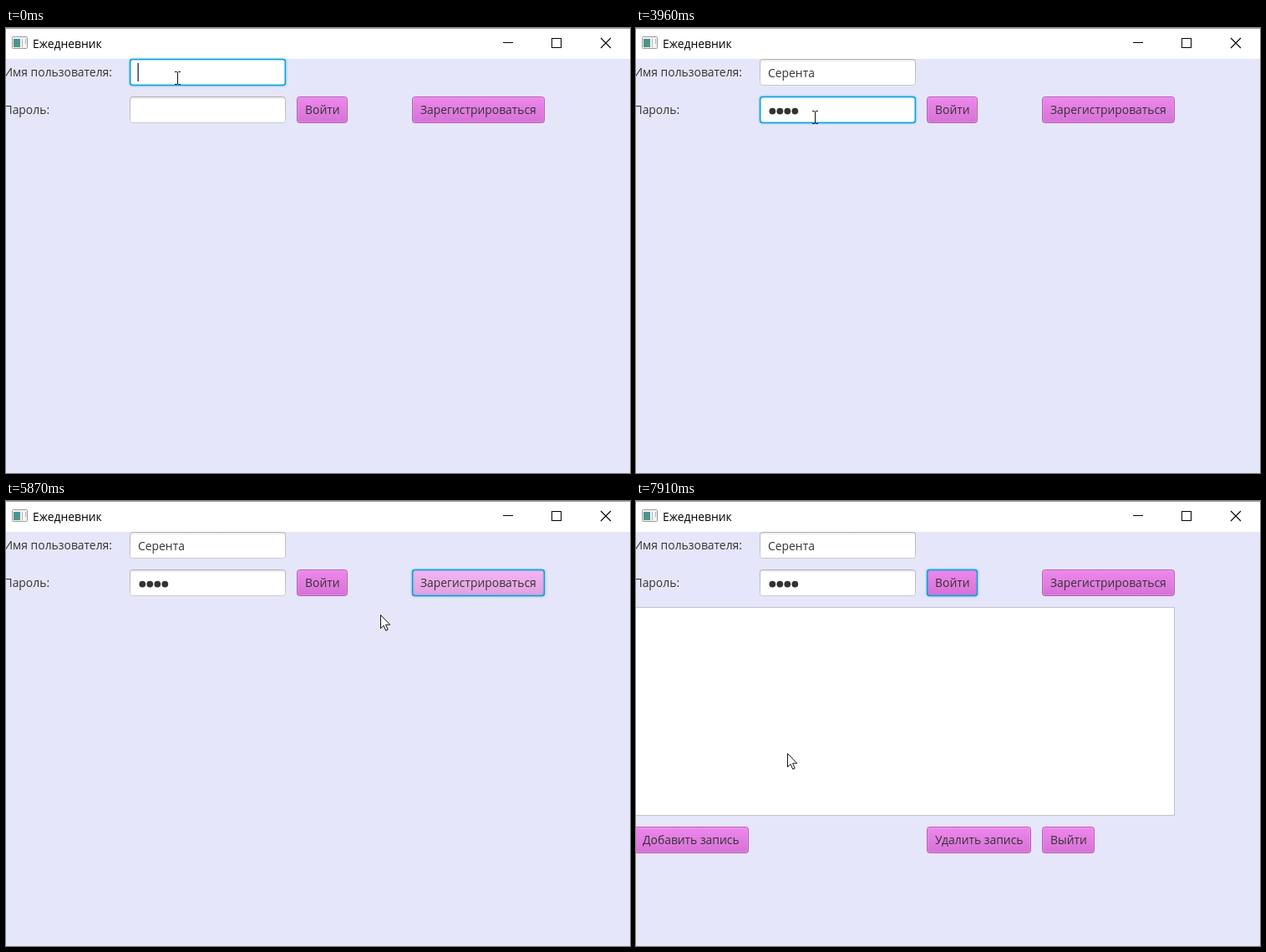
These frames come from a looping animation (747 px wide and 533 px high, 8000 ms). An HTML page:

```html
<!DOCTYPE html>
<html lang="ru">
<head>
<meta charset="utf-8">
<title>Ежедневник</title>
<style>
  html, body { margin: 0; width: 100%; height: 100%; overflow: hidden; background: #e6e6fa; }
  svg { display: block; width: 747px; height: 533px; }
  text { font: 13.9px "Open Sans", "Noto Sans", sans-serif; fill: #333; white-space: pre; }
</style>
</head>
<body>
<svg id="stage" viewBox="0 0 747 533" xmlns="http://www.w3.org/2000/svg">
  <defs>
    <linearGradient id="normal" x2="0" y2="1"><stop stop-color="#ee88ec"/><stop offset="1" stop-color="#d671d6"/></linearGradient>
    <linearGradient id="hover" x2="0" y2="1"><stop stop-color="#f4b6f2"/><stop offset="1" stop-color="#e0a0df"/></linearGradient>
    <linearGradient id="pressed" x2="0" y2="1"><stop stop-color="#dc80da"/><stop offset="1" stop-color="#c46bc5"/></linearGradient>
    <linearGradient id="shade" x2="0" y2="1"><stop stop-color="#e4e4e4"/><stop offset=".13" stop-color="#fff"/></linearGradient>
    <linearGradient id="rim" x2="0" y2="1"><stop stop-color="#b2b2b4"/><stop offset="1" stop-color="#c9c9cb"/></linearGradient>
    <linearGradient id="teal" x2="0" y2="1"><stop stop-color="#4a8fa0"/><stop offset="1" stop-color="#4f9a78"/></linearGradient>
  </defs>
  <rect width="747" height="533" fill="#e6e6fa"/>
  <rect width="747" height="37" fill="#fff"/>
  <rect width="747" height="1" fill="#a0a0a0"/>
  <g id="icon">
    <rect x="7.5" y="10.5" width="18" height="14" rx="1" fill="#f4f4f4" stroke="#9a9a9a"/>
    <rect x="9" y="13" width="8" height="10" fill="url(#teal)"/>
    <path d="M19.5 13V23M23.5 13V19" stroke="#b4b4b4" fill="none"/>
  </g>
  <text x="32" y="24" style="fill:#000">Ежедневник</text>
  <g fill="none" stroke="#000">
    <path d="M595 17.5H607"/>
    <rect x="653.5" y="12.5" width="11" height="11"/>
    <path d="M712 12L724 24M724 12L712 24" stroke-width="1.1"/>
  </g>
  <text x="-2.5" y="58">Имя пользователя:</text>
  <text x="-2.5" y="103">Пароль:</text>
  <g id="form"></g>
  <g id="diary">
    <rect x="-1.5" y="127.5" width="646" height="249" fill="#fff" stroke="#c4c4c8"/>
  </g>
  <text id="name" x="158" y="59"></text>
  <g id="dots" fill="#333"></g>
  <rect id="caret" width="1.3" height="22" fill="#222"/>
  <path id="beam" d="M-3.5 -7.5H-1L0 -6.7L1 -7.5H3.5M-3.5 7.5H-1L0 6.7L1 7.5H3.5M0 -7V7" fill="none" stroke="#111"/>
  <path id="arrow" d="M.5 .5V16.6L4.1 13.2L6.7 19.2L9.2 18.1L6.6 12.2H11.7Z" fill="#fff" stroke="#111"/>
</svg>
<script>
const NS = "http://www.w3.org/2000/svg";
const LOOP = 8000;
const USER = "Серента";
const $ = id => document.getElementById(id);

function add(parent, tag, attrs, text) {
  const el = document.createElementNS(NS, tag);
  set(el, attrs);
  if (text) el.textContent = text;
  return parent.appendChild(el);
}
function set(el, attrs) {
  for (const key in attrs) el.setAttribute(key, attrs[key]);
}
const show = (el, on) => set(el, { visibility: on ? "visible" : "hidden" });

// Rounded focus outline with a faint halo
function ring(parent, x, y, w, h) {
  const g = add(parent, "g", { fill: "none", stroke: "#039ed3" });
  add(g, "rect", { x: x - 1, y: y - 1, width: w + 2, height: h + 2, rx: 4.5, "stroke-width": 2, opacity: .13 });
  add(g, "rect", { x: x + .6, y: y + .6, width: w - 1.2, height: h - 1.2, rx: 3, "stroke-width": 1.5 });
  add(g, "rect", { x: x + 2, y: y + 2, width: w - 4, height: h - 4, rx: 2, "stroke-width": 1.4, opacity: .13 });
  return g;
}

function field(y) {
  const x = 148, w = 187, h = 32;
  add($("form"), "rect", { x: x + .5, y: y + .5, width: w - 1, height: h - 1, rx: 3, fill: "url(#shade)", stroke: "url(#rim)" });
  const focus = add($("form"), "g", {});
  add(focus, "rect", { x: x + 1, y: y + 1, width: w - 2, height: h - 2, rx: 3, fill: "#fff" });
  ring(focus, x, y, w, h);
  return focus;
}

function button(parent, x, y, w, label) {
  const h = 32;
  const body = add(parent, "rect", { x: x + .5, y: y + .5, width: w - 1, height: h - 1, rx: 3 });
  add(parent, "rect", { x: x + 1.5, y: y + 1.5, width: w - 3, height: h - 3, rx: 2.2, fill: "none", stroke: "#fff", opacity: .14 });
  const focus = ring(parent, x, y, w, h);
  add(parent, "text", { x: x + 10, y: y + 21 }, label);
  return (state, focused) => {
    set(body, { fill: `url(#${state})`, stroke: state === "hover" ? "#bd8abf" : "#b45fb5" });
    show(focus, focused);
  };
}

const userFocus = field(37);
const passFocus = field(82);
const login = button($("form"), 348, 82, 61, "Войти");
const register = button($("form"), 486, 82, 159, "Зарегистрироваться");
[[-2, 137, "Добавить запись"], [348, 125, "Удалить запись"], [486, 63, "Выйти"]]
  .forEach(([x, w, label]) => button($("diary"), x, 390, w, label)("normal", false));
const dots = [0, 1, 2, 3].map(i => add($("dots"), "circle", { cx: 163.3 + 9 * i, cy: 99.6, r: 3.9 }));

// Step tracks: [start time, value...]
const typed = [[0, 0], [520, 1], [640, 2], [890, 4], [1140, 5], [1260, 6], [1380, 7]];
const secret = [[0, 0], [3160, 2], [3440, 3], [3560, 4]];
const blink = [[0, 1], [370, 0], [520, 1], [1880, 0], [2290, 1], [2540, 0], [2790, 1], [3960, 0], [4470, 1], [5000, 0]];
const focusOn = [[0, "user"], [2540, "pass"], [5000, "register"], [6860, "login"]];
const loginState = [[0, "normal"], [4350, "hover"], [4470, "normal"], [6290, "hover"],
  [6860, "pressed"], [6980, "hover"], [7640, "normal"]];
const registerState = [[0, "normal"], [4620, "hover"], [5000, "pressed"], [5240, "hover"], [5990, "normal"]];
const pointer = [
  [0, "beam", 205.5, 60], [2030, "beam", 204.5, 82], [2150, "beam", 203.5, 102], [2290, "beam", 203.5, 105],
  [3960, "beam", 214.5, 107], [4080, "beam", 256.5, 109], [4200, "beam", 322.5, 110],
  [4350, "arrow", 388, 100], [4470, "arrow", 462, 94], [4620, "arrow", 524, 86], [4740, "arrow", 538, 91],
  [5120, "arrow", 539, 92], [5870, "arrow", 448, 136], [5990, "arrow", 391, 129], [6140, "arrow", 371, 114],
  [6290, "arrow", 371, 107], [6440, "arrow", 371, 106], [7640, "arrow", 336, 150],
  [7760, "arrow", 256, 232], [7910, "arrow", 181, 302]
];
const at = (track, t) => track.findLast(step => step[0] <= t).slice(1);

function draw(t) {
  const [focus] = at(focusOn, t);
  const [letters] = at(typed, t);
  const [bullets] = at(secret, t);
  const [kind, x, y] = at(pointer, t);

  show(userFocus, focus === "user");
  show(passFocus, focus === "pass");
  login(at(loginState, t)[0], focus === "login");
  register(at(registerState, t)[0], focus === "register");
  set($("diary"), { display: t >= 6980 ? "inline" : "none" });

  $("name").textContent = USER.slice(0, letters);
  dots.forEach((dot, i) => show(dot, i < bullets));
  const inUser = focus === "user";
  const offset = inUser ? (letters ? $("name").getComputedTextLength() : 0) : bullets * 9;
  set($("caret"), { x: 157.5 + offset, y: inUser ? 42 : 87 });
  show($("caret"), at(blink, t)[0]);

  for (const id of ["beam", "arrow"]) show($(id), id === kind);
  set($(kind), { transform: `translate(${x} ${y})` });
}

function tick() {
  draw(performance.now() % LOOP);
  requestAnimationFrame(tick);
}
tick();
</script>
</body>
</html>
```
